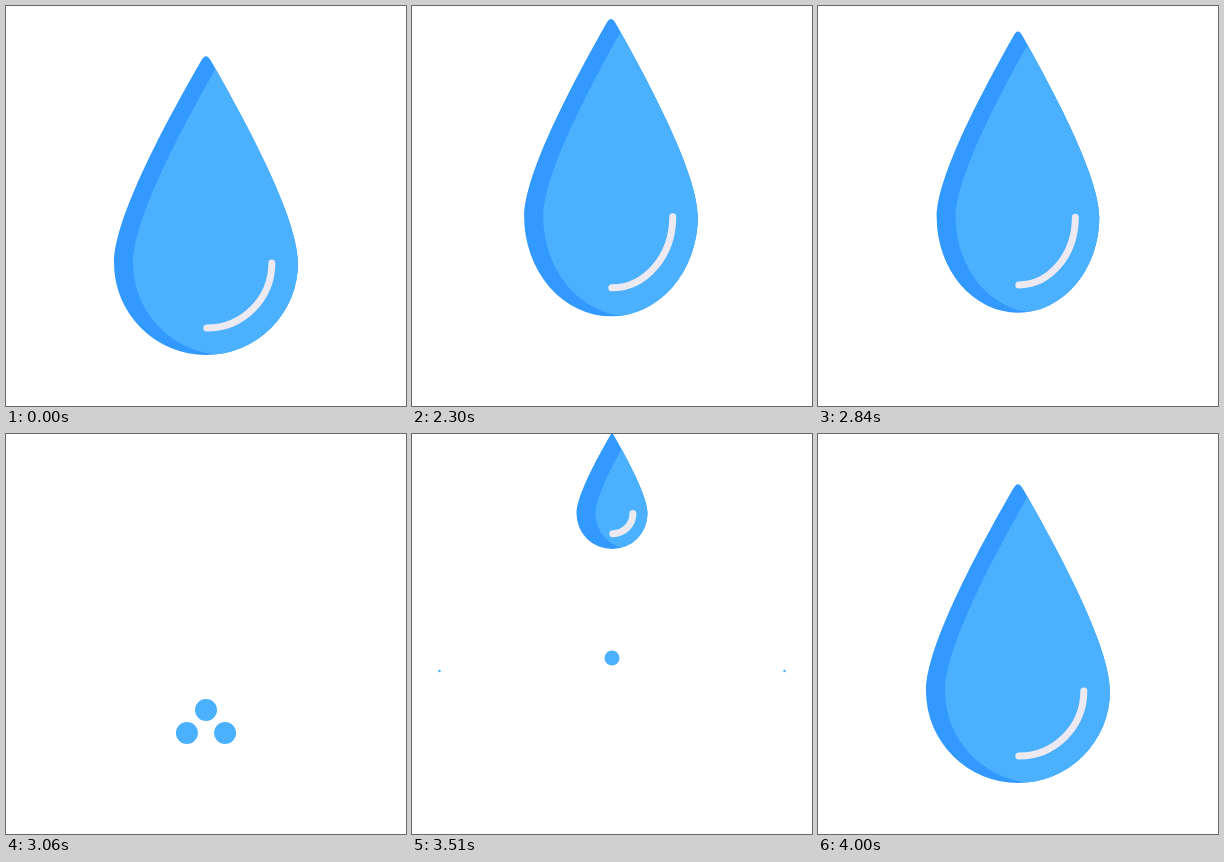
Animation of 400x400 px, one loop 4060 ms. Source, as an HTML page with a canvas:

```html
<!DOCTYPE html>
<html lang="en">
<head>
<meta charset="utf-8">
<title>Water drop</title>
<style>
  html, body { margin: 0; width: 100%; height: 100%; overflow: hidden; background: #fff; }
  canvas { display: block; width: 400px; height: 400px; }
</style>
</head>
<body>
<canvas id="stage"></canvas>
<script>
const LOOP = 4060, LIGHT = '#4bb1ff', DARK = '#3199ff', SHINE = '#ece9f1';
const LIFT = 2015, FALL = 2550, SPLASH = 3004, ENTER = 3452;

const canvas = document.getElementById('stage');
const ratio = window.devicePixelRatio || 1;
canvas.width = canvas.height = 400 * ratio;
const ctx = canvas.getContext('2d');
ctx.scale(ratio, ratio);

const mix = (a, b, p) => a + (b - a) * p;
const progress = (t, start, length) => Math.min(1, Math.max(0, (t - start) / length));
const easeOut = (u, n) => 1 - (1 - u) ** n;

// A drop is round below its widest line y and pointed above it.
function dropPath({ x, y, rx, up, down }) {
  const sx = rx / 92, sy = up / 207;
  const path = new Path2D();
  path.moveTo(x - 5 * sx, y - 202 * sy);
  path.quadraticCurveTo(x, y - 211.5 * sy, x + 5 * sx, y - 202 * sy);
  path.bezierCurveTo(x + 40 * sx, y - 141 * sy, x + rx, y - 45 * sy, x + rx, y);
  path.ellipse(x, y, rx, down, 0, 0, Math.PI);
  path.bezierCurveTo(x - rx, y - 45 * sy, x - 40 * sx, y - 141 * sy, x - 5 * sx, y - 202 * sy);
  path.closePath();
  return path;
}

function drawDrop(drop) {
  const outline = dropPath(drop);
  ctx.fillStyle = DARK;
  ctx.fill(outline);

  // The shade keeps its width at every size.
  ctx.save();
  ctx.clip(outline);
  ctx.fillStyle = LIGHT;
  ctx.fill(dropPath({ ...drop, x: drop.x + 19 }));
  ctx.restore();

  const inset = r => 0.795 * r - 8.1;
  if (inset(drop.rx) < 4) return;
  ctx.beginPath();
  ctx.ellipse(drop.x + 0.8, drop.y, inset(drop.rx), inset(drop.down), 0, 0, Math.PI / 2);
  ctx.strokeStyle = SHINE;
  ctx.lineWidth = 7;
  ctx.lineCap = 'round';
  ctx.stroke();
}

function poseAt(t) {
  if (t < FALL) {
    const u = progress(t, LIFT, 525), p = easeOut(u, 2.5);
    return {
      x: 200 - Math.sin(Math.PI * u),
      y: mix(257, 203, p),
      rx: mix(92, 86, p),
      up: mix(207, 196.5, p),
      down: mix(92, 101, p)
    };
  }
  if (t < SPLASH) {
    const p = progress(t, FALL, SPLASH - FALL) ** 6.5, s = 1 - p;
    return { x: 200, y: mix(203, 353, p), rx: 86 * s, up: 196.5 * s, down: 101 * s };
  }
  if (t < ENTER) return null;
  const p = easeOut(progress(t, ENTER, 548), 4.36);
  return { x: 200, y: mix(-32, 257, p), rx: 92 * p, up: 207 * p, down: 92 * p };
}

// Splash beads fly like thrown balls and shrink away at the end.
const beads = [
  { vx: -0.341, vy: 0.99, g: 0.001495, end: 3528 },
  { vx: 0, vy: 1.421, g: 0.00229, end: 3612 },
  { vx: 0.341, vy: 0.99, g: 0.001495, end: 3528 }
];

function drawBead({ vx, vy, g, end }, t) {
  const r = 11 * progress(end - t, 0, 150), s = t - 3000;
  if (s < 0 || r <= 0) return;
  ctx.beginPath();
  ctx.arc(200 + vx * (t - SPLASH), 353 - vy * s + g * s * s, r, 0, 2 * Math.PI);
  ctx.fillStyle = LIGHT;
  ctx.fill();
}

// Motion advances in steps of 30 ms.
function stepped(t) {
  const base = t < 2998 ? 2030 : 3000;
  return base + 30 * Math.floor((t + 2 - base) / 30);
}

function draw() {
  const t = stepped(performance.now() % LOOP);
  ctx.clearRect(0, 0, 400, 400);
  beads.forEach(bead => drawBead(bead, t));
  const pose = poseAt(t);
  if (pose) drawDrop(pose);
  requestAnimationFrame(draw);
}
draw();
</script>
</body>
</html>
```
